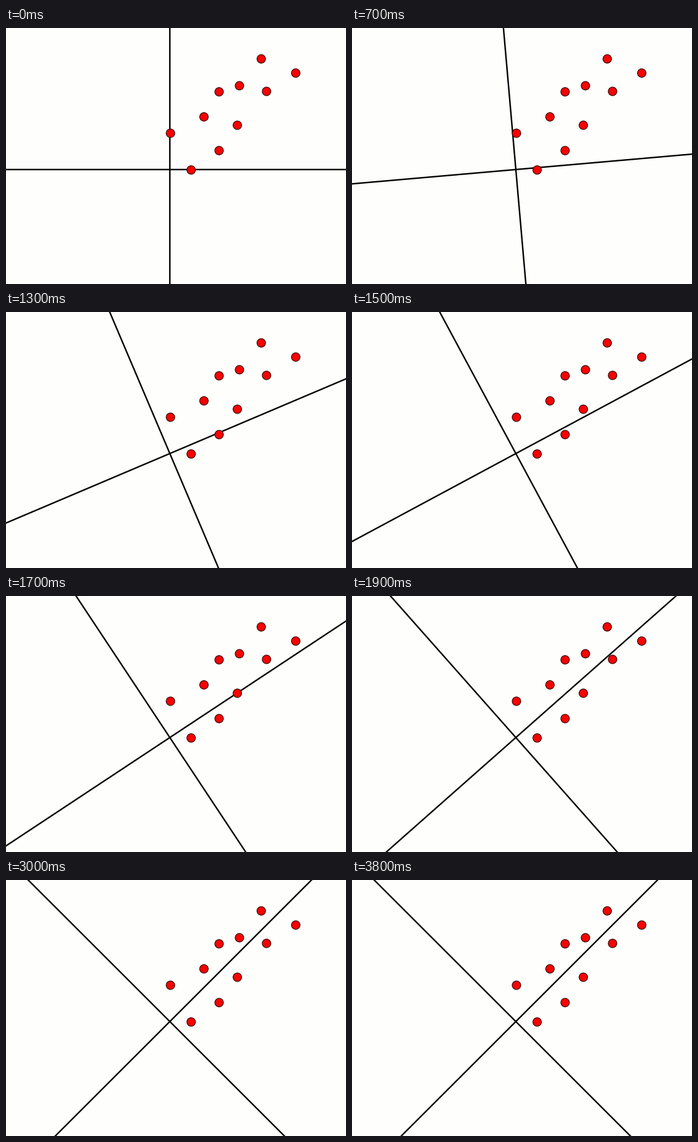
Recreate the animation shown at these times as a matplotlib script. Size 552 by 416 pixels, loop 3.9 s.

```python
import numpy as np
import matplotlib.pyplot as plt
from matplotlib.animation import FuncAnimation
from matplotlib.patches import Circle

W, H, DPI = 552, 416, 64
STEP, LOOP = 100, 3900
PX = 72 / DPI  # one pixel in points

PIVOT = np.array([266.0, 230.0])
REACH = 700

# Scatter relative to the pivot, y upwards
UPPER = [(1, 59), (55.4, 85.6), (80, 126.3), (113, 136.2), (148.4, 179.8)]
LOWER = [(34.6, -0.7), (80, 30.8), (109.6, 72), (157, 127), (204.4, 156.8)]

# The turn runs at a nearly even pace, then eases out to its end
SPIN_MS = [500, 700, 1300, 1700, 1900]
SPIN_DEG = [0, 5, 23, 33.5, 41.5]
END_MS, END_DEG = 2300, 45


def turn(t):
    left = np.clip((END_MS - t) / (END_MS - SPIN_MS[-1]), 0, 1)
    settle = (END_DEG - SPIN_DEG[-1]) * (1 - left ** 2)
    return np.interp(t, SPIN_MS, SPIN_DEG) + settle


fig = plt.figure(figsize=(W / DPI, H / DPI), dpi=DPI, facecolor="#fefefc")
ax = fig.add_axes([0, 0, 1, 1])
ax.set_xlim(0, W)
ax.set_ylim(H, 0)
ax.axis("off")

axes_lines = [ax.plot([], [], color="black", lw=2.4 * PX, zorder=1)[0]
              for _ in range(2)]
for x, y in UPPER + LOWER:
    ax.add_patch(Circle(PIVOT + (x, -y), 6.9, fc="#fa0000", ec="#300000",
                        lw=1.2 * PX, zorder=2))


def update(i):
    angle = turn(i * STEP)
    for line, base in zip(axes_lines, (0, 90)):
        a = np.radians(angle + base)
        d = REACH * np.array([np.cos(a), -np.sin(a)])
        line.set_data(*zip(PIVOT - d, PIVOT + d))
    return axes_lines


anim = FuncAnimation(fig, update, frames=LOOP // STEP, interval=STEP,
                     repeat=True, repeat_delay=0)
plt.show()
```
